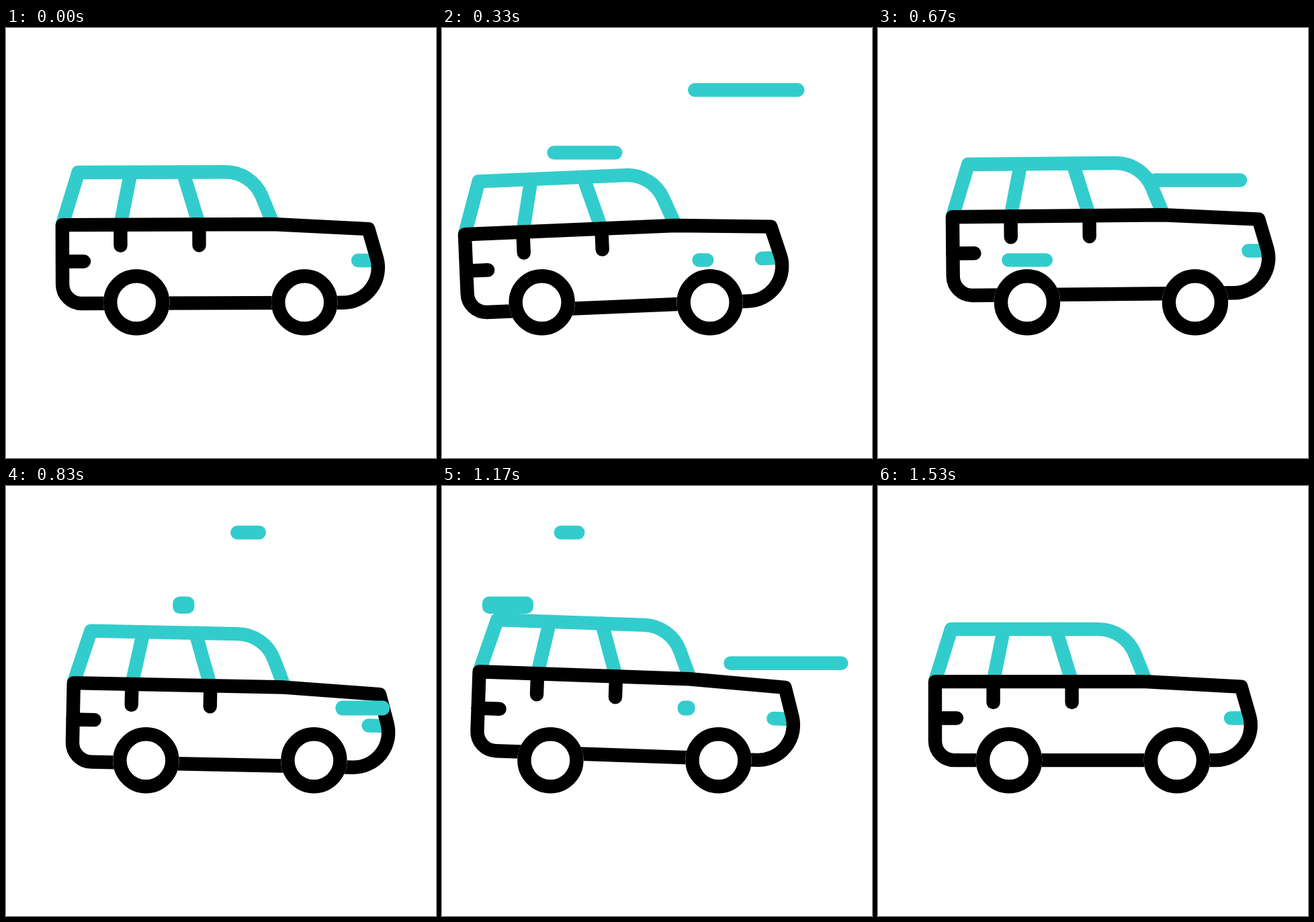
Animation, 640 px wide and 640 px high, one loop 1670 ms. Source, as an HTML page with a canvas:

```html
<!DOCTYPE html>
<html>
<head>
<meta charset="utf-8">
<style>
  html, body { margin: 0; width: 100%; height: 100%; overflow: hidden; background: #fff; }
  canvas { display: block; width: 640px; height: 640px; }
</style>
</head>
<body>
<canvas id="stage" width="640" height="640"></canvas>
<script>
const ctx = document.getElementById('stage').getContext('2d');
const LOOP = 1670, TICKS_PER_MS = 0.03, LAST_TICK = 46;
const TEAL = '#33cccc', BLACK = '#000', STROKE = 20.4;
const REAR = 195, WHEELBASE = 250, AXLE = 408.3;
const BELT = 291.1, SILL = 408.1, ROOF = 213.1;
const START = -0.9, REST = 45;

const clamp = u => Math.min(1, Math.max(0, u));
const linear = u => u;
const smooth = u => u * u * (3 - 2 * u);
const ramp = (tick, from, length) => smooth(clamp((tick - from) / length));

// Moves from rest through the [tick, value] turns and back to rest.
function swing(tick, ease, turns, end = REST) {
  let [from, a] = [START, 0];
  for (const [to, b] of [...turns, [end, 0]]) {
    if (tick < to) return a + (b - a) * ease((tick - from) / (to - from));
    [from, a] = [to, b];
  }
  return 0;
}

// Turns of equal size that alternate in sign.
const zigzag = (size, ...ticks) => ticks.map((tick, i) => [tick, i % 2 ? -size : size]);

const drive = tick => swing(tick, smooth, [[10.8, -47], [21.2, 29.8], [32.9, -36.5]]);
const bounce = tick => swing(tick, linear, zigzag(11.9, 7.4, 20, 26.5, 37));
const tilt = tick => swing(tick, linear, zigzag(-3.03, 12.7, 30.4), 44);

function line(color, x0, y0, x1, y1) {
  ctx.strokeStyle = color;
  ctx.lineCap = 'round';
  ctx.beginPath();
  ctx.moveTo(x0, y0);
  ctx.lineTo(x1, y1);
  ctx.stroke();
}

function disc(x, y, radius, paint) {
  ctx.beginPath();
  ctx.arc(x, y, radius, 0, Math.PI * 2);
  ctx[paint]();
}

function drawCabin() {
  line(TEAL, 187.2, ROOF, 171.5, BELT);
  line(TEAL, 264.8, ROOF, 288.5, BELT);
  line(TEAL, 525, 345.5, 545, 345.5);
  ctx.lineCap = 'butt';
  ctx.beginPath();
  ctx.moveTo(84.8, BELT);
  ctx.lineTo(109, ROOF);
  ctx.arcTo(367.4, ROOF, 399, BELT, 58.5);
  ctx.lineTo(399, BELT);
  ctx.stroke();
}

function drawHull() {
  ctx.strokeStyle = BLACK;
  ctx.beginPath();
  ctx.moveTo(300, SILL);
  ctx.arcTo(85, SILL, 85, BELT, 28.5);
  ctx.lineTo(85, BELT);
  ctx.lineTo(398, BELT);
  ctx.lineTo(540.5, 298.7);
  ctx.arcTo(571.8, SILL, 300, SILL, 52);
  ctx.closePath();
  ctx.stroke();
  line(BLACK, 85, 345.5, 117, 345.5);
  for (const x of [171.6, 288.6]) line(BLACK, x, BELT, x, BELT + 31);
}

function drawWheel(x) {
  ctx.fillStyle = '#fff';
  disc(x, AXLE, 49.3, 'fill');
  ctx.strokeStyle = BLACK;
  disc(x, AXLE, 39, 'stroke');
}

function drawCar(tick) {
  ctx.save();
  ctx.translate(drive(tick), 0);
  ctx.save();
  ctx.translate(300, 406 + bounce(tick));
  ctx.rotate(tilt(tick) * Math.PI / 180);
  ctx.translate(-300, -406);
  drawCabin();
  drawHull();
  ctx.restore();
  drawWheel(REAR);
  drawWheel(REAR + WHEELBASE);
  ctx.restore();
}

// A line of wind grows to the left, then its right end catches up.
function drawWind(age, right, y, thickness = STROKE) {
  const head = ramp(age, 3.64, 9.23), tail = ramp(age, 9.69, 8.13);
  if (head <= 0 || tail >= 1) return;
  const reach = 200, left = right - STROKE - reach * head;
  ctx.fillStyle = TEAL;
  ctx.beginPath();
  ctx.roundRect(left, y - thickness / 2, STROKE + reach * (head - tail), thickness, STROKE / 2);
  ctx.fill();
}

function drawFirstGust(tick) {
  drawWind(tick, 540.4, 92.2);
  drawWind(tick - 2, 268.5, 185.5);
  drawWind(tick - 5, 404.5, 345.4);
  drawWind(tick - 7, 621.8, 226.5);
}

function drawSecondGust(tick) {
  drawWind(tick, 571, 330.5, 22);
  drawWind(tick - 1, 387, 69.2);
  drawWind(tick - 2, 280.4, 177.2, 25.5);
  drawWind(tick - 6, 618.4, 263.7);
}

function draw(time) {
  const tick = Math.min(LAST_TICK, Math.floor((time % LOOP + 4) * TICKS_PER_MS));
  ctx.fillStyle = '#fff';
  ctx.fillRect(0, 0, 640, 640);
  ctx.lineWidth = STROKE;
  ctx.lineJoin = 'round';
  drawCar(tick);
  drawFirstGust(tick);
  drawSecondGust(tick - 18);
}

let origin;
function loop(now) {
  origin ??= now;
  draw(now - origin);
  requestAnimationFrame(loop);
}
draw(0);
requestAnimationFrame(loop);
</script>
</body>
</html>
```
